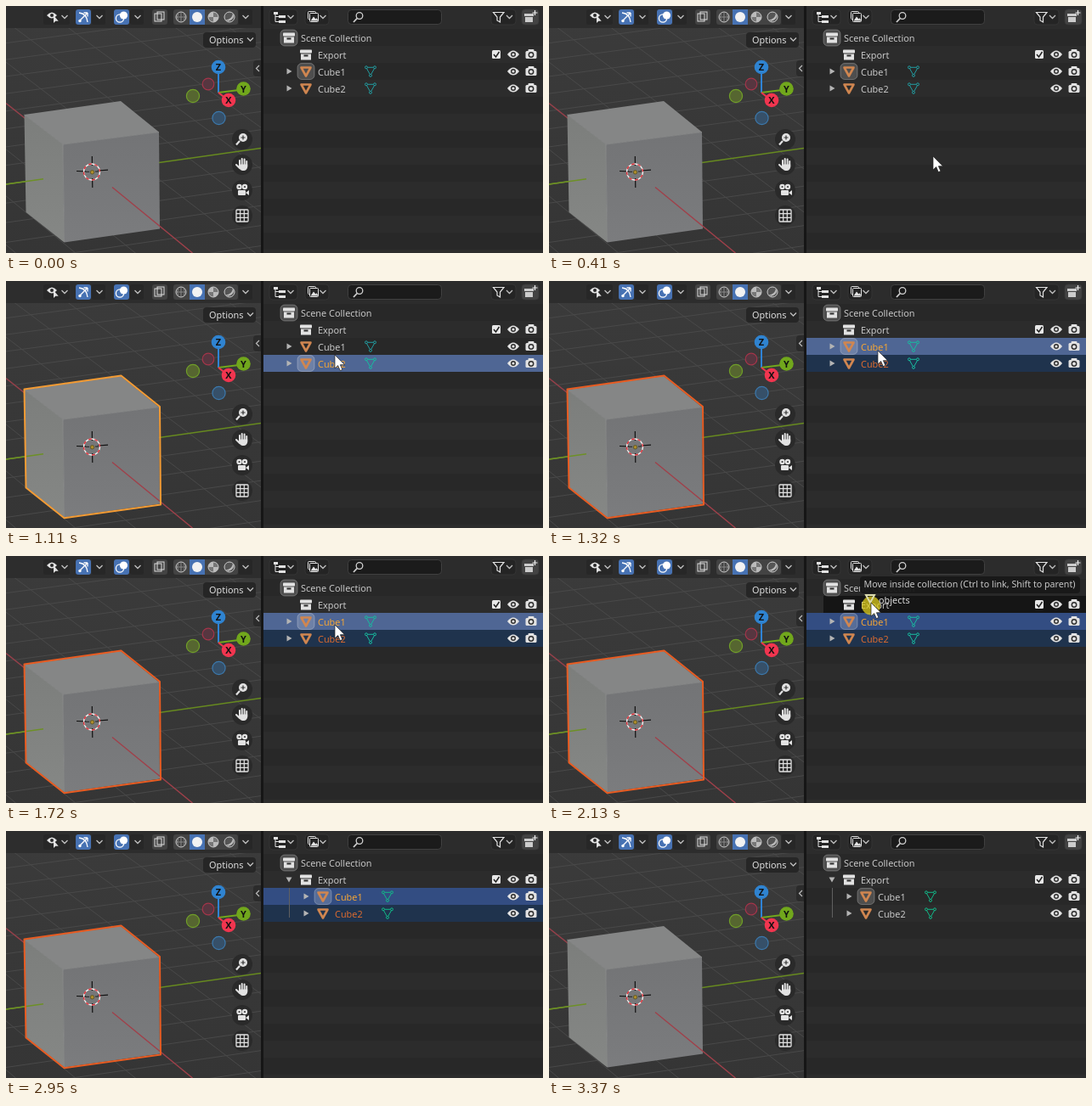
Animation, 632 px wide and 291 px high, one loop 4.12 s. Source, as an HTML page:

```html
<!DOCTYPE html>
<html lang="en">
<head>
<meta charset="utf-8">
<title>Outliner: move to collection</title>
<style>
html, body { margin: 0; width: 100%; height: 100%; overflow: hidden; background: #282828; }
svg { display: block; width: 632px; height: 291px; }
text { font: 10.9px "Noto Sans", "Open Sans", sans-serif; }
</style>
</head>
<body>
<svg id="stage" viewBox="0 0 632 291"></svg>
<script>
const stage = document.getElementById('stage');
const LOOP = 4120;

const rect = (x, y, w, h, fill, rx = 0, more = '') =>
  `<rect x="${x}" y="${y}" width="${w}" height="${h}" rx="${rx}" fill="${fill}" ${more}/>`;
const circle = (x, y, r, fill, stroke = 'none', sw = 1) =>
  `<circle cx="${x}" cy="${y}" r="${r}" fill="${fill}" stroke="${stroke}" stroke-width="${sw}"/>`;
const line = (d, stroke, w = 1, more = '') =>
  `<path d="${d}" fill="none" stroke="${stroke}" stroke-width="${w}" ${more}/>`;
const shape = (d, fill, more = '') => `<path d="${d}" fill="${fill}" ${more}/>`;
const text = (x, y, s, fill = '#c6c6c6', more = '') => `<text x="${x}" y="${y}" fill="${fill}" ${more}>${s}</text>`;
const at = (x, y, body) => `<g transform="translate(${x} ${y})">${body}</g>`;
const group = (id, body = '') => `<g id="${id}">${body}</g>`;
const chevron = (x, y) => line(`M${x - 3.5} ${y - 2}l3.5 3.5l3.5-3.5`, '#c0c0c0', 1.3);

// Floor grid: x runs down-right, y runs right
function project(x, y) {
  const w = 1 - 0.008 * x + 0.003 * y;
  return `${(101 + (24 * x + 57.5 * y) / w).toFixed(1)} ${(195.5 + (18.8 * x - 8.1 * y) / w).toFixed(1)}`;
}
function grid() {
  let d = '';
  for (let i = -14; i <= 14; i++) {
    if (!i) continue;
    d += `M${project(i, -16)}L${project(i, 16)}M${project(-16, i)}L${project(16, i)}`;
  }
  return line(d, '#494949');
}

const HULL = 'M21.5 127.5L135.500 111.500L181 148L182 263.500L68.500 279.300L23.500 243.500Z';
function cube() {
  return shape('M21.500 128L135 112L180 148.500L67 163Z', '#858686') +
    shape('M21.500 128L67 163L68.500 278.500L23.500 243Z', 'url(#left)') +
    shape('M67 163L180 148.500L181 262.500L68.500 278.500Z', 'url(#right)') +
    line('M21.500 128L67 163L180 148.500M67 163L68.500 278', '#8c8d8d', .8);
}

function cursor3d() {
  return line('M83 194.5l11 .3M108 194l12-.8M101.3 177l.1 11M101.6 203l.2 11', '#111', 1.2) +
    circle(101, 195.5, 9.5, 'none', '#f3f3f3', 1.4) +
    line('M91.500 195.5a9.500 9.500 0 1 0 19 0a9.500 9.500 0 1 0-19 0', '#e0313a', 1.4, 'stroke-dasharray="3.73"') +
    line('M94 195.3h4M105 195h4', '#222') +
    circle(101.5, 195.8, 2.2, '#ae8c2c', '#4a4a1a', .7);
}

function axisBall(x, y, name, fill) {
  return circle(x, y, 8.3, fill) +
    text(x, y + 4, name, '#111', 'text-anchor="middle" style="font-weight:600"');
}
function gizmo() {
  return circle(238, 92, 6.8, '#573640', '#a5354a', 1.2) +
    circle(220, 106, 7.6, '#566630', '#709f28', 1.2) +
    circle(250.5, 132, 7.6, '#365069', '#3c79ad', 1.2) +
    line('M250 80V102', '#2f83d6', 2) + line('M250 102L274 99', '#71a71c', 2) +
    line('M250 102L260 110', '#f1354f', 2) +
    axisBall(250, 72, 'Z', '#2f83d0') + axisBall(279.5, 97.5, 'Y', '#71a71c') +
    axisBall(262, 111, 'X', '#f1354f');
}

const INK = '#e2e2e2';
function navButtons() {
  const icons = [
    circle(1, -2, 5, INK) + line('M-3 2L-7 6.500', INK, 2.2) + line('M-1.5-2h5M1-4.500v5', '#333', 1.2),
    line('M-3 1V-5M-.3 0V-7M2.600 0V-6.500M5.200 2V-4M-7 0L-3 4', INK, 2, 'stroke-linecap="round"') +
      shape('M-4-.500H6.200V3Q5 7 2 7H0Q-3 6-4 3Z', INK),
    circle(-3.5, -4, 3.2, INK) + circle(3, -4, 3.2, INK) + circle(-3.5, -4, 1, '#333') + circle(3, -4, 1, '#333') +
      rect(-5, 0, 9, 6, INK, 1) + shape('M4 3L8 0V6Z', INK),
    rect(-7, -7, 14, 14, 'none', 1, `stroke="${INK}" stroke-width="1.3"`) +
      line('M-7-2.300H7M-7 2.300H7M-2.300-7V7M2.300-7V7', INK, 1.2),
  ];
  return icons.map((icon, i) => at(278, 157 + 30 * i, circle(0, 0, 12, '#2a2a2a') + icon)).join('');
}

const eye = (x, y) => at(x, y,
  shape('M-7 0Q0-9 7 0Q0 9-7 0Z', INK) + circle(0, 0, 3, '#2b2b2b') + circle(0, 0, 1.6, INK));
const camera = (x, y) => at(x, y,
  rect(-6.5, -4, 13, 9, INK, 1.5) + rect(-3.5, -6, 7, 3, INK, 1) +
  circle(0, .5, 3.4, '#2b2b2b') + circle(0, .5, 2, INK));
const archive = (x, y) => at(x, y,
  rect(-7, -6, 14, 4, INK, .8) + shape('M-6-1H6V6H-6Z', INK) + rect(-2.5, 0, 5, 2, '#2b2b2b'));

const BUTTON = '#434343';
function viewHeader() {
  const tile = (x, w, fill) => rect(x, 4, w, 18, fill, 3);
  return rect(0, 0, 300, 26, '#2d2d2d') +
    tile(44, 31, '#272727') + at(54, 11, shape('M-6 0Q0-7 6 0Q0 7-6 0Z', INK) + circle(0, 0, 2, '#272727')) +
    shape('M56 11v9l2.300-2.200h3.400Z', INK) + chevron(69, 13) +
    tile(82, 18, '#4772b3') + tile(101, 16, '#272727') + chevron(110, 13) +
    line('M86 8Q95 9 96 19M86 18L96 8M96 8h-4.500M96 8v4.500', '#fff', 1.3) + circle(87, 17.5, 1.7, '#fff') +
    tile(127, 18, '#4772b3') + tile(146, 16, '#272727') + chevron(155, 13) +
    circle(138.5, 11, 4.6, '#fff') + circle(134, 14.5, 4.6, 'none', '#fff', 1.3) +
    tile(172, 18, BUTTON) +
    rect(175, 9, 8, 9, 'none', 0, 'stroke="#ddd"') + rect(178, 7, 8, 9, 'none', 0, 'stroke="#ddd"') +
    tile(197, 76, BUTTON) + rect(216, 4, 18, 18, '#4772b3') +
    circle(206, 13, 6, 'none', '#ccc') + line('M200 13h12M206 7v12M203 8Q200 13 203 18M209 8Q212 13 209 18', '#999', .8) +
    circle(225, 13, 6, '#f2f2f2') +
    circle(244, 13, 6, '#777', '#ccc') + shape('M244 13V7A6 6 0 0 0 238 13ZM244 13V19A6 6 0 0 0 250 13Z', '#bbb') +
    circle(263, 13, 6, '#555', '#ccc') + shape('M258.500 16.500Q266 16 267 8.500A6 6 0 0 1 258.500 16.500Z', '#bbb') +
    tile(274, 16, '#272727') + chevron(282, 13);
}

function viewport() {
  return `<g clip-path="url(#view)">` + rect(0, 0, 300, 291, 'url(#back)') + grid() +
    line('M0 114.500L125 213.500', '#96404a', 1.4) + line('M0 210L300 167.500', '#678a1f', 1.4) + cube() +
    line('M125 213.500L219.500 291', '#a0404a', 1.4) + line('M0 210L44 203.800', '#6d9026', 1.4) +
    group('outline') + cursor3d() + gizmo() + navButtons() + viewHeader() +
    rect(232, 31, 62, 18, '#262626', 4) + text(239, 44, 'Options', '#dedede') + chevron(287.5, 39.5) +
    shape('M300 64h-5q-4 0-4 4v11q0 4 4 4h5Z', '#2b2b2b') + line('M298 70l-3.500 3.500l3.500 3.500', '#bbb', 1.2) + '</g>' +
    rect(300, 0, 3, 291, '#161616');
}

function listHeader() {
  const tile = (x, w, fill = '#242424') => rect(x, 4, w, 18, fill, 4, 'stroke="#3a3a3a" stroke-width=".7"');
  return rect(303, 0, 329, 27, '#2c2c2c') +
    tile(310, 33) + rect(315, 7, 5, 3, INK) + rect(321, 11, 8, 3, INK) + rect(321, 17, 8, 3, INK) +
    line('M317 10V18.500H321M317 12.500H321', INK) + chevron(335, 13) +
    tile(352, 28) + rect(355.5, 6.5, 9, 9, '#242424', 1, `stroke="${INK}"`) +
    rect(357.5, 8.5, 10, 10, '#242424', 1, `stroke="${INK}"`) +
    shape('M358.500 17.500l3.500-5l2.500 3l1-1.500l2 3.500Z', INK) + chevron(373, 13) +
    rect(402.5, 4.5, 110, 17, '#1b1b1b', 4, 'stroke="#404040"') +
    circle(416, 11.5, 3.8, 'none', '#d0d0d0', 1.3) + line('M413.200 14.500L409 19', '#d0d0d0', 1.8) +
    tile(571, 29) + line('M573.500 7.500H586L581.500 13V19L578 17V13Z', INK, 1.2) + chevron(592.5, 13) +
    tile(607, 20, BUTTON) + rect(610, 9, 11, 3, '#ccc') + rect(611, 13, 9, 6, '#ccc') + line('M622.500 5v6M619.500 8h6', '#eee', 1.2);
}

function stripes() {
  let out = rect(303, 27, 329, 264, '#282828');
  for (let y = 47; y < 291; y += 40) out += rect(303, y, 329, 20, '#2c2c2c');
  return out;
}

const chip = (x, y) => rect(x - 10, y - 9.5, 20, 19, '#ffffff', 5, 'fill-opacity=".18" stroke="#fff" stroke-opacity=".25"');
const arrowRight = (x, y) => shape(`M${x - 2.5} ${y - 3.5}l6 3.500l-6 3.500Z`, '#b4b4b4');
const arrowDown = (x, y) => shape(`M${x - 3.5} ${y - 2.5}h7l-3.500 6Z`, '#b4b4b4');

function objectRow(name, y, dx, active, ink, mesh) {
  const x = 353 + dx;
  return arrowRight(333 + dx, y) + (active ? chip(x, y) : '') +
    line(`M${x - 5.5} ${y - 4.5}h11l-5.500 10Z`, '#d08650', 2.6, 'stroke-linejoin="round"') +
    text(367 + dx, y + 5, name, ink) +
    at(429 + dx, y, line('M-3.300-4.700H3.300M-4.300-3L-.800 3.300M4.300-3L.800 3.300', mesh) +
      [[-5, -4.7], [5, -4.7], [0, 4.8]].map(p => circle(...p, 1.5, 'none', mesh)).join('')) +
    eye(597, y) + camera(618, y);
}

const mouse = shape('M0 0V16L3.700 12.600L6.300 18.600L8.900 17.500L6.400 11.700H11.500Z', '#fff', 'stroke="#222" stroke-width=".7"');

stage.innerHTML = `<defs>
  <linearGradient id="back" x2="0" y2="1"><stop stop-color="#3b3b3b"/><stop offset="1" stop-color="#353535"/></linearGradient>
  <linearGradient id="left" x2="0" y2="1"><stop stop-color="#7c7e7c"/><stop offset="1" stop-color="#858785"/></linearGradient>
  <linearGradient id="right" x2="0" y2="1"><stop stop-color="#737476"/><stop offset="1" stop-color="#7b7c7e"/></linearGradient>
  <clipPath id="view"><path d="M0 0H300V291H0Z"/></clipPath></defs>` +
  viewport() + stripes() + listHeader() + group('rows') + group('drag') + group('mouse', mouse);

const [outline, rows, drag, pointer] = ['outline', 'rows', 'drag', 'mouse'].map(id => document.getElementById(id));

// time, x, y of the pointer tip
const PATH = [
  [130, 541, 263], [340, 472, 196], [620, 390, 118], [690, 388, 105], [760, 388, 103], [970, 388, 97],
  [1110, 387, 87], [1180, 387, 84], [1320, 387, 82], [1520, 387, 81], [1780, 387, 81], [1990, 381, 64],
  [2130, 379, 55], [2390, 379, 56], [2600, 328, 109], [2880, 168, 249], [2950, 168, 249],
];

function tip(t) {
  let i = 1;
  while (i < PATH.length - 1 && PATH[i][0] < t) i++;
  const [a, b] = [PATH[i - 1], PATH[i]];
  const k = Math.min(1, Math.max(0, (t - a[0]) / (b[0] - a[0])));
  return [a[1] + (b[1] - a[1]) * k, a[2] + (b[2] - a[2]) * k].map(Math.round);
}

// The screen refreshes in 70 ms steps after each pause
function step(t) {
  const start = [2390, 1850, 1720, 130].find(s => t >= s) ?? 0;
  return start + Math.floor((t - start) / 70) * 70;
}

function rowFill(selected, active, hover) {
  if (selected && active) return hover ? '#4f6694' : '#334d82';
  if (selected) return hover ? '#3c4f65' : '#1f334d';
  return hover ? '#474747' : 'none';
}

function draw(t) {
  const now = step(t);
  const shown = t >= 130 && t < 2950;
  const dragging = t >= 1850 && t < 2390;
  const moved = t >= 2390;
  const picked = t < 900 || t >= 3300 ? 0 : t < 1320 ? 1 : 2;
  const activeRow = picked === 1 ? 4 : 3;
  const [x, y] = tip(now);

  // Hover follows the pointer one refresh late
  const [hx, hy] = tip(now - 70);
  const hover = shown && !dragging && hx > 303 ? Math.floor((hy - 7) / 20) : 0;
  const dx = moved ? 20 : 0;

  outline.innerHTML = picked ? line(HULL, picked === 1 ? '#f39b34' : '#e85c22', 2, 'stroke-linejoin="round"') : '';

  let out = '';
  if (hover === 1 || hover === 2) out += rect(303, 7 + 20 * hover, 329, 20, '#474747');
  if (dragging && y < 67) out += rect(323, 47, 309, 20, '#151515');
  out += chip(333, 37.5) + archive(333, 37.5) + text(347, 42, 'Scene Collection') +
    (moved ? arrowDown(333, 57) : '') + archive(353, 57.5) + text(367, 62, 'Export') +
    rect(572, 52, 10, 10, '#e8e8e8', 1.5) + line('M574 57l2.500 3l4-6', '#222', 1.5) +
    eye(597, 57) + camera(618, 57);
  [3, 4].forEach(row => {
    const selected = picked === 2 || (picked === 1 && row === 4);
    const active = row === activeRow;
    const ink = !selected ? '#c6c6c6' : active ? '#f3a536' : '#d96a30';
    const mesh = moved ? '#12b888' : hover === row || picked === 2 ? '#18bba0' : '#229ca0';
    out += rect(303, 7 + 20 * row, 329, 20, rowFill(selected, active, hover === row)) +
      objectRow('Cube' + (row - 2), 17 + 20 * row, dx, active, ink, mesh);
  });
  if (moved) out += line('M333.500 67V102', '#606060');
  rows.innerHTML = out;

  drag.innerHTML = !dragging ? '' :
    (y < 67 ? rect(366, 24, 259, 20, '#191919', 4, 'opacity=".95"') +
      text(370.5, 37, 'Move inside collection (Ctrl to link, Shift to parent)', '#c8c8c8', 'style="font-size:10.7px;font-weight:500"') : '') +
    circle(x, y + 3.5, 11, 'rgba(222,204,28,.75)') +
    at(x - 1, y, line('M-5-9H5L0 0Z', '#dcdcae', 2) + text(10, 1, 'objects', '#dcdcdc', 'style="font-weight:500"'));

  pointer.setAttribute('transform', `translate(${x} ${y})`);
  pointer.setAttribute('visibility', shown ? 'visible' : 'hidden');
}

const began = performance.now();
function tick() {
  draw((performance.now() - began) % LOOP);
  requestAnimationFrame(tick);
}
tick();
</script>
</body>
</html>
```
